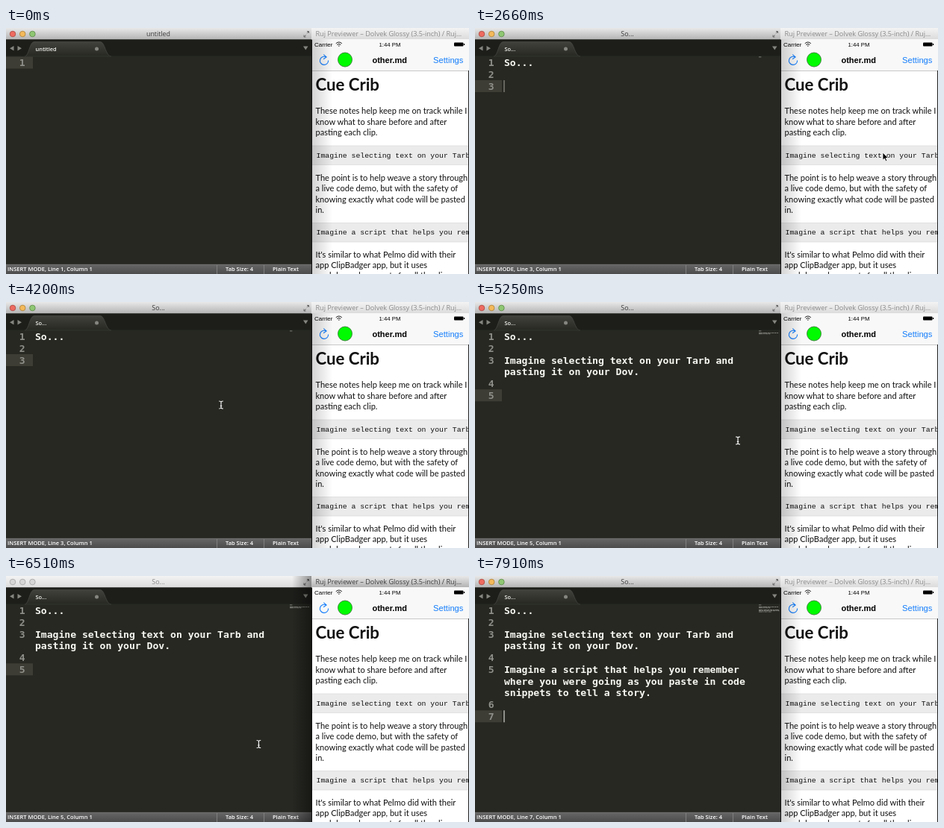
Recreate the animation shown at these times as an HTML page. Size 620 by 330 pixels, loop 8 s.

```html
<!DOCTYPE html>
<html lang="en">
<head>
<meta charset="utf-8">
<title>Clip pasting demo</title>
<style>
  html, body { margin: 0; width: 100%; height: 100%; overflow: hidden; background: #272822; }
  svg { display: block; width: 620px; height: 330px; }
  .ui { font-family: "Open Sans", "Noto Sans", sans-serif; }
  .mono { font: bold 13.08px "DejaVu Sans Mono", monospace; fill: #f8f8f2; }
  .num { fill: #8f908a; text-anchor: end; }
  .bar { font-size: 7.5px; font-weight: 600; fill: #fff; }
  .nav { font-family: "Liberation Sans", sans-serif; }
  .body { font: 11.05px Lato, sans-serif; fill: #111; }
  .code { font: 9.8px "Liberation Mono", monospace; fill: #111; }
  .mid { text-anchor: middle; }
</style>
</head>
<body>
<svg viewBox="0 0 620 330" xmlns="http://www.w3.org/2000/svg">
  <defs>
    <linearGradient id="on" x2="0" y2="1"><stop stop-color="#e8e8e8"/><stop offset="1" stop-color="#b3b3b3"/></linearGradient>
    <linearGradient id="off" x2="0" y2="1"><stop stop-color="#f3f3f3"/><stop offset="1" stop-color="#dcdcdc"/></linearGradient>
    <linearGradient id="tab" x2="0" y2="1"><stop stop-color="#41423c"/><stop offset="1" stop-color="#272822"/></linearGradient>
    <linearGradient id="foot" x2="0" y2="1"><stop stop-color="#676767"/><stop offset="1" stop-color="#4c4c4c"/></linearGradient>
    <linearGradient id="shadeR"><stop stop-opacity=".17"/><stop offset="1" stop-opacity="0"/></linearGradient>
    <linearGradient id="shadeL"><stop stop-opacity="0"/><stop offset="1" stop-opacity=".4"/></linearGradient>
  </defs>

  <!-- editor -->
  <rect width="409" height="330" fill="#272822"/>
  <rect id="edTop" width="409" height="15.5"/>
  <g id="lights" stroke-width=".8"></g>
  <text id="edTitle" class="ui mid" x="204" y="11.2" font-size="8.9"></text>
  <path d="M399 9.5v2.5h2.5M399 12l2.6-2.6M403 4.5h2.5v2.5M405.5 4.5l-2.6 2.6" fill="none" stroke="#666"/>
  <rect y="15.5" width="409" height="22.5" fill="#1d1e1a"/>
  <path d="M25 38C31 38 31 18.5 38 18.5H126C133 18.5 133 38 141 38Z" fill="url(#tab)" stroke="#4a4b45" stroke-width=".7"/>
  <rect y="37.5" width="409" height="1" fill="#272822"/>
  <path d="M10.5 24v6.5l-5.5-3.2zM15.5 24v6.5l5.5-3.2zM398 24.5h6.5l-3.2 5z" fill="#85857f"/>
  <text id="tabName" class="ui" x="39.5" y="30.5" font-size="7.4" font-weight="600" fill="#f4f4f0"></text>
  <circle cx="121.5" cy="28" r="2.5" fill="#85867f"/>
  <g id="doc"></g>
  <rect id="caret" width="1" height="16" fill="#f8f8f0"/>
  <rect y="317" width="409" height="13" fill="url(#foot)"/>
  <path d="M0 317.3H409" stroke="#777" stroke-width=".6"/>
  <path d="M282.5 318v12M345.5 318v12" stroke="#8a8a8a" stroke-width=".8"/>
  <text id="status" class="ui bar" x="2" y="326.2"></text>
  <text class="ui bar" x="294" y="326.2">Tab Size: 4</text>
  <text class="ui bar" x="357" y="326.2">Plain Text</text>
  <rect id="edShade" x="383" width="26" height="330" fill="url(#shadeL)"/>

  <!-- preview -->
  <rect x="409" width="211" height="330" fill="#fff"/>
  <rect id="simTop" x="409" width="211" height="15"/>
  <text id="simTitle" class="ui" x="414.5" y="11.2" font-size="9.1">Ruj Previewer – Dolvek Glossy (3.5-inch) / Ruj...</text>
  <rect x="410" y="15" width="210" height="42" fill="#f8f8f8"/>
  <rect x="410" y="57" width="210" height=".7" fill="#b0b0b0"/>
  <g class="nav">
    <text x="413" y="24.6" font-size="8">Carrier</text>
    <text class="mid" x="514" y="24.6" font-size="7.8">1:44 PM</text>
    <text class="mid" x="513.7" y="46.8" font-size="11" font-weight="bold">other.md</text>
    <text x="572" y="46.8" font-size="11.2" fill="#157efb">Settings</text>
  </g>
  <path d="M441.8 20.8q4-3.6 8 0M443.3 22.5q2.5-2.2 5 0M445 24h1.6" fill="none" stroke="#111"/>
  <rect x="600" y="19.5" width="12.5" height="5" rx="1"/>
  <rect x="613" y="21" width="1.2" height="2"/>
  <path d="M428.5 38.8A5.6 5.6 0 1 0 431.6 43.5M425.3 35.7l3.8 3.2-4 2.8" fill="none" stroke="#157efb" stroke-width="1.1"/>
  <circle cx="454" cy="42.5" r="9.5" fill="#00fb00" stroke="#3c7a3c" stroke-width=".9"/>
  <g id="page"></g>
  <rect id="simShade" x="410" y="15" width="27" height="315" fill="url(#shadeR)"/>
  <path d="M409.5 15.5V330" stroke="#111"/>
  <path d="M619.5 57V330" stroke="#222"/>

  <!-- pointer -->
  <circle id="click" r="9.3" fill="#eb3c1e"/>
  <path id="arrow" d="M0 0V10.2L2.4 8.1L4 11.7L5.7 10.9L4.2 7.5H7.3Z" fill="#000" stroke="#fff" stroke-width=".8"/>
  <path id="beam" d="M-2.8-5Q0-5 0-3.5Q0-5 2.8-5M0-4V4M-2.8 5Q0 5 0 3.5Q0 5 2.8 5M-1.2 1.5H1.2" fill="none" stroke="#fff" stroke-width="1.1"/>
</svg>
<script>
const LOOP = 8000, STEP = 70, COLS = 43, CW = 7.874, ROW = 15.75;
const $ = id => document.getElementById(id);
const set = (el, attrs) => { for (const k in attrs) el.setAttribute(k, attrs[k]); };

function add(parent, tag, attrs, text) {
  const el = document.createElementNS('http://www.w3.org/2000/svg', tag);
  set(el, attrs);
  if (text !== undefined) el.textContent = text;
  parent.append(el);
}

const noteA = 'Imagine selecting text on your Tarb and pasting it on your Dov.';
const noteB = 'Imagine a script that helps you remember where you were going as you paste in code snippets to tell a story.';

// time, inserted text
const edits = [[140, 'S'], [280, 'o'], [490, '.'], [630, '.'], [840, '.'], [980, '\n'], [1330, '\n'],
  [4270, noteA], [4620, '\n'], [4760, '\n'], [7350, noteB], [7700, '\n'], [7840, '\n']];

// time, caret opacity
const blink = [[0, 0], [140, 1], [1610, .5], [1680, .1], [1820, 0], [2030, .5], [2100, 1],
  [2660, .6], [2730, .2], [2800, 0], [3500, 1], [4060, .5], [4130, .2], [4200, 0], [4270, 1],
  [5040, .5], [5110, 0], [5460, .5], [5530, 1], [5880, .5], [5950, 0], [6860, 1]];

// start, end, from, to, hidden after
const moves = [
  [2030, 2520, [584, 140], [546, 167], 3220],
  [3220, 3500, [546, 167], [288, 138], 4620],
  [4970, 5670, [288, 138], [470, 274], 6230],
  [6230, 6720, [470, 274], [253, 194], 7700]
];

// time, place, whether the editor gets focus
const clicks = [[2800, 546, 167, false], [3500, 288, 138, true], [6090, 470.5, 274.5, false], [6860, 253, 194, true]];
const fade = [.35, .5, .5, .35, .15];

const last = (list, t) => list.filter(e => e[0] <= t).pop();

function buildPage() {
  const page = $('page');
  const para = (y, lines) => lines.forEach((s, i) => add(page, 'text', { class: 'body', x: 414.5, y: y + i * 14.4 }, s));
  const code = (y, s) => {
    add(page, 'rect', { x: 410, y, width: 210, height: 25.5, fill: '#ebebeb' });
    add(page, 'path', { d: `M410 ${y}h210m0 25.5h-210`, stroke: '#d9d9d9', 'stroke-width': .7 });
    add(page, 'text', { class: 'code', x: 415.5, y: y + 15.6 }, s);
  };
  add(page, 'text', { class: 'body', x: 414.5, y: 83.5, style: 'font-size:22.2px;font-weight:700' }, 'Cue Crib');
  para(115.3, ['These notes help keep me on track while I', 'know what to share before and after', 'pasting each clip.']);
  code(158, noteA);
  para(205, ['The point is to help weave a story through', 'a live code demo, but with the safety of', 'knowing exactly what code will be pasted', 'in.']);
  code(261.5, noteB);
  para(307.5, ['It\'s similar to what Pelmo did with their', 'app ClipBadger app, but it uses', 'markdown documents for all the clips']);
}

function wrap(line) {
  const rows = [''];
  for (const word of line.split(' ')) {
    const joined = rows.at(-1) ? rows.at(-1) + ' ' + word : word;
    if (joined.length > COLS) rows.push(word);
    else rows[rows.length - 1] = joined;
  }
  return rows;
}

let shown = null;
function drawDoc(text) {
  if (text === shown) return;
  shown = text;
  const doc = $('doc'), lines = text.split('\n');
  const rows = lines.flatMap((line, n) => wrap(line).map((s, i) => [i ? '' : n + 1, s]));
  const end = rows.length - 1;
  doc.replaceChildren();
  add(doc, 'rect', { y: 38.5 + end * ROW, width: 36, height: 16, fill: '#3e3d35' });
  rows.forEach(([num, s], r) => {
    const y = 51 + r * ROW;
    add(doc, 'text', { class: 'mono num', x: 25.5, y }, num);
    add(doc, 'text', { class: 'mono', x: 39, y }, s);
    for (const m of s.matchAll(/\S+/g))
      add(doc, 'rect', { x: 380 + m.index * .67, y: 38.5 + r * 1.3, width: m[0].length * .67, height: .8, fill: '#b5b5ae', opacity: .75 });
  });
  set($('caret'), { x: 38.5 + rows[end][1].length * CW, y: 38.5 + end * ROW });
  $('edTitle').textContent = $('tabName').textContent = lines[0] || 'untitled';
  $('status').textContent = `INSERT MODE, Line ${lines.length}, Column ${lines.at(-1).length + 1}`;
}

let focus = null;
function drawFocus(active) {
  if (active === focus) return;
  focus = active;
  const top = on => ({ fill: `url(#${on ? 'on' : 'off'})` });
  const ink = on => ({ fill: on ? '#3d3d3d' : '#8a8a8a' });
  set($('edTop'), top(active));
  set($('simTop'), top(!active));
  set($('edTitle'), ink(active));
  set($('simTitle'), ink(!active));
  set($('edShade'), { opacity: active ? 0 : 1 });
  set($('simShade'), { opacity: active ? 1 : 0 });
  $('lights').replaceChildren();
  const fills = active ? ['#ee6b60', '#f3b95a', '#8fc773'] : Array(3).fill('#d6d6d6');
  const rims = active ? ['#a8473f', '#ad7f38', '#5c8a47'] : Array(3).fill('#a2a2a2');
  fills.forEach((fill, i) => add($('lights'), 'circle', { cx: 9 + i * 13.2, cy: 8, r: 3.8, fill, stroke: rims[i] }));
}

function drawPointer(t) {
  const move = last(moves, t), on = move && t < move[4];
  let x = 0, y = 0;
  if (on) {
    const [a, b, from, to] = move;
    const p = Math.min(1, (t - a) / (b - a)), e = p * p * (3 - 2 * p);
    x = from[0] + (to[0] - from[0]) * e;
    y = from[1] + (to[1] - from[1]) * e;
  }
  const transform = `translate(${x} ${y})`;
  set($('arrow'), { transform, opacity: on && x >= 409 ? 1 : 0 });
  set($('beam'), { transform, opacity: on && x < 409 ? 1 : 0 });
  const c = last(clicks, t);
  set($('click'), { cx: c ? c[1] : 0, cy: c ? c[2] : 0, opacity: c && fade[Math.floor((t - c[0]) / STEP)] || 0 });
}

function render(now) {
  const t = Math.floor((now % LOOP) / STEP) * STEP;
  const click = last(clicks, t);
  drawDoc(edits.filter(e => e[0] <= t).map(e => e[1]).join(''));
  drawFocus(click ? click[3] : true);
  set($('caret'), { opacity: last(blink, t)[1] });
  drawPointer(t);
}

buildPage();
const start = performance.now();
render(0);
requestAnimationFrame(function tick(now) {
  render(Math.max(0, now - start));
  requestAnimationFrame(tick);
});
</script>
</body>
</html>
```
